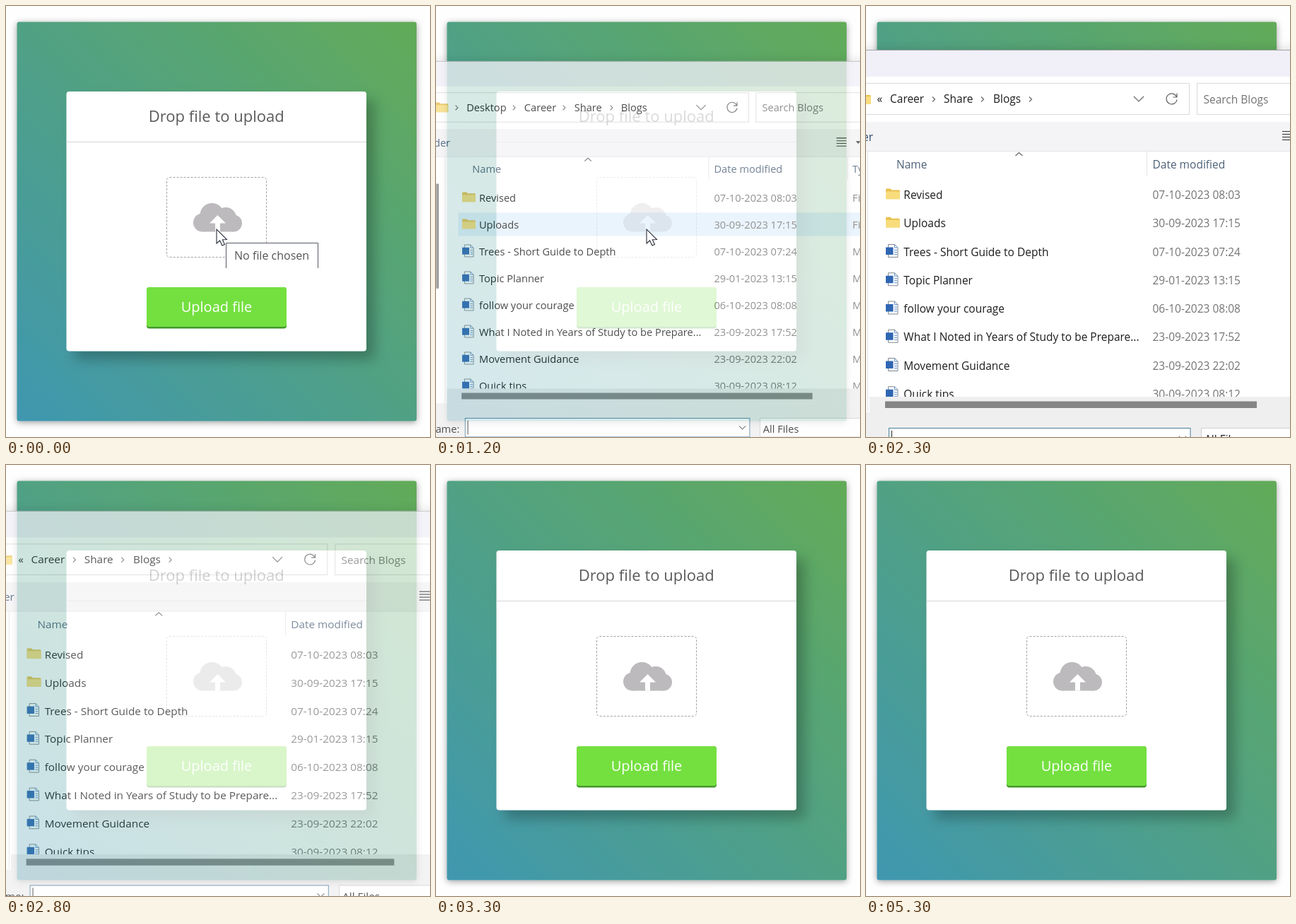
These frames come from a looping animation (600 by 610 pixels, 5400 ms). An HTML page:

```html
<!DOCTYPE html>
<html lang="en">
<head>
<meta charset="utf-8">
<title>File upload</title>
<style>
  html, body { margin: 0; width: 100%; height: 100%; overflow: hidden; background: #fefefe; }
  svg { display: block; }
  text { font: 15.5px "Open Sans", sans-serif; fill: #1d1d1d; white-space: pre; }
  .dim { fill: #747474; }
  .head { fill: #4d6178; }
  .end { text-anchor: end; }
  .mid { text-anchor: middle; }
  .line { fill: none; stroke: #666; stroke-width: 1.2; }
</style>
</head>
<body>
<svg width="600" height="610" viewBox="0 0 600 610">
  <defs>
    <linearGradient id="meadow" x1="0" y1="1" x2="1" y2="0">
      <stop stop-color="#3f97b0"/><stop offset="1" stop-color="#62ab58"/>
    </linearGradient>
    <filter id="soft"><feDropShadow dx="0" dy="2" stdDeviation="5" flood-opacity=".38"/></filter>
    <filter id="deep" x="-20%" y="-20%" width="140%" height="140%">
      <feDropShadow dx="12" dy="12" stdDeviation="9" flood-opacity=".25"/>
    </filter>
    <filter id="glow"><feDropShadow dx="0" dy="0" stdDeviation="8" flood-opacity=".16"/></filter>
    <g id="folder">
      <path d="M0 1.500q0-1.500 1.500-1.500h5l2 2h10q1.500 0 1.500 1.500v11H0z" fill="#e8c04e"/>
      <path d="M0 4h20v9.500q0 1.500-1.500 1.500h-17q-1.500 0-1.500-1.500z" fill="#f8dc7c"/>
    </g>
    <g id="doc">
      <path d="M3.500 .5h9l4.500 4.500v13.500h-13.500z" fill="#fff" stroke="#808890"/>
      <path d="M12.500 .5v4.500h4.500M12 8.500h4M12 11.500h4M12 14.500h4" fill="none" stroke="#5b8fd0"/>
      <rect y="4.500" width="10.500" height="10.500" fill="#2f66b3"/>
    </g>
  </defs>

  <rect x="15.500" y="22.500" width="565.500" height="565" rx="3" fill="url(#meadow)" filter="url(#soft)"/>
  <rect x="85.500" y="121" width="424.500" height="367.500" rx="4" fill="#fff" filter="url(#deep)"/>
  <path d="M86 192.500H510" stroke="#d6d6dc"/>
  <text class="mid" x="297.700" y="164" style="font-size:22px;fill:#5a5a5a">Drop file to upload</text>
  <rect x="227.500" y="242.500" width="141" height="113" rx="4" fill="none" stroke="#a2a2a2" stroke-dasharray="3 2"/>
  <g fill="#bcbabc">
    <circle cx="278" cy="306.500" r="13"/><circle cx="291.500" cy="296" r="17"/>
    <circle cx="311" cy="300" r="15"/><circle cx="322" cy="307.500" r="12"/>
    <rect x="278" y="300" width="44" height="19.500"/>
  </g>
  <path d="M299.500 296L311 307.500H303V319.500H296V307.500H288z" fill="#fff"/>
  <rect x="199" y="398" width="198" height="58.500" rx="4" fill="#429a2c"/>
  <rect x="199" y="398" width="198" height="56" rx="4" fill="#74e03f"/>
  <text class="mid" x="298" y="433" style="font-size:20px;fill:#fff">Upload file</text>

  <g id="tip">
    <rect x="311" y="335" width="131" height="36" fill="#fff"/>
    <path d="M311.500 371V335.500H441.500V371" fill="none" stroke="#555b66"/>
    <text x="323" y="359" style="font-size:16px;fill:#555">No file chosen</text>
  </g>

  <g id="dialog">
    <rect x="-400" y="62.500" width="1400" height="700" fill="#efefef" stroke="#a5a5a8" filter="url(#glow)"/>
    <rect x="-400" y="63" width="1400" height="37" fill="#f1f0f8"/>
    <rect x="-400" y="100" width="1400" height="475" fill="#fff"/>
    <g fill="#fff" stroke="#d9d9d9">
      <rect x="-100" y="109.500" width="557.500" height="44"/>
      <rect x="468.500" y="109.500" width="300" height="44"/>
    </g>
    <use href="#folder" x="-13" y="124"/>
    <g id="longPath"></g>
    <g id="shortPath"></g>
    <path class="line" d="M379 128l7 7 7-7M439.500 128.500a7.500 7.500 0 1 0 .5 4M440 123.500v5.500h-5.500"/>
    <text class="dim" x="477.500" y="137.500">Search Blogs</text>

    <rect x="-400" y="164" width="1400" height="41" fill="#f4f3f5"/>
    <path d="M-400 205.500H1000M397.500 206V240M605.500 206V240M2.500 206V574" stroke="#e3e3e6"/>
    <text class="end" x="10" y="190.500" style="fill:#2c4a6c">New folder</text>
    <path d="M589 177.500h15M589 181.500h15M589 185.500h15M589 189.500h15" stroke="#333" stroke-width="1.200"/>
    <path d="M618 182h7l-3.500 4z" fill="#333"/>
    <path class="line" d="M211.500 212l5-4.500 5 4.500"/>
    <text class="head" x="43" y="229.500">Name</text>
    <text class="head" x="405.500" y="229.500">Date modified</text>
    <text class="head" x="613" y="229.500">Type</text>
    <rect id="hover" x="22" width="900" height="35" fill="#e5f2fd"/>
    <g id="rows"></g>

    <rect x="5" y="553" width="995" height="22" fill="#efefef"/>
    <rect x="27" y="559.500" width="526" height="9.500" fill="#858585"/>
    <rect x="-11" y="246" width="4" height="157" fill="#858585"/>
    <text class="end" x="24" y="619">File name:</text>
    <rect x="32.500" y="597.500" width="426.500" height="28" fill="#fff" stroke="#4a7f9c"/>
    <path d="M36.500 601V622" stroke="#222"/>
    <path class="line" d="M443 609l5 5 5-5"/>
    <rect x="474.500" y="597.500" width="300" height="28" fill="#fff" stroke="#cfcfcf"/>
    <text x="479" y="619">All Files</text>
  </g>

  <path id="cursor" d="M0 0V20L4.500 16L8 23L11.500 21.500L8.300 14.800L14.500 14.500z" fill="#fff" stroke="#2b2f3a" stroke-width="1.100"/>
</svg>

<script>
const $ = id => document.getElementById(id);
const clamp = v => Math.min(1, Math.max(0, v));
const LOOP = 5400, STEP = 100, ROW_TOP = 267.5, ROW_GAP = 40.25;

const label = (x, y, text, cls = '') => `<text x="${x}" y="${y}" class="${cls}">${text}</text>`;
const chevron = x => `<path class="line" d="M${x - 2} 128.5l3.500 3.500-3.500 3.500"/>`;
const crumbs = (words, chevrons) =>
  words.map(([x, w]) => label(x, 137, w)).join('') + chevrons.map(chevron).join('');

$('longPath').innerHTML = crumbs(
  [[34.5, 'Desktop'], [121, 'Career'], [196, 'Share'], [266, 'Blogs']], [20, 106, 181, 252]);
$('shortPath').innerHTML = crumbs(
  [[15.5, '«'], [34, 'Career'], [110, 'Share'], [180, 'Blogs']], [96, 165, 233]);

const files = [
  ['Revised', '07-10-2023 08:03'],
  ['Uploads', '30-09-2023 17:15'],
  ['Trees - Short Guide to Depth', '07-10-2023 07:24'],
  ['Topic Planner', '29-01-2023 13:15'],
  ['follow your courage', '06-10-2023 08:08'],
  ['What I Noted in Years of Study to be Prepare...', '23-09-2023 17:52'],
  ['Movement Guidance', '23-09-2023 22:02'],
  ['Quick tips', '30-09-2023 08:12']
];
$('rows').innerHTML = files.map(([name, date], i) => {
  const y = ROW_TOP + i * ROW_GAP, isFolder = i < 2;
  return `<use href="#${isFolder ? 'folder' : 'doc'}" x="28" y="${y - (isFolder ? 9 : 11)}"/>`
    + label(53.3, y + 5.7, name) + label(405.5, y + 5.7, date, 'dim')
    + label(613, y + 5.7, isFolder ? 'File folder' : 'Memo', 'dim');
}).join('');

// Pointer stops: time, x, y
const track = [[0, 298, 316], [1300, 298, 316], [1600, 345, 305], [1700, 385, 318],
  [1800, 445, 365], [1900, 520, 450], [2000, 580, 550], [2100, 630, 640]];

function pointerAt(t) {
  const i = track.findIndex(stop => stop[0] > t);
  if (i < 0) return track[track.length - 1].slice(1);
  const [t0, x0, y0] = track[i - 1], [t1, x1, y1] = track[i];
  const k = (t - t0) / (t1 - t0);
  return [x0 + (x1 - x0) * k, y0 + (y1 - y0) * k];
}

const show = (id, on) => $(id).setAttribute('display', on ? 'inline' : 'none');

function draw(now) {
  const t = Math.floor(now % LOOP / STEP) * STEP;
  const [x, y] = pointerAt(t);
  $('cursor').setAttribute('transform', `translate(${x} ${y})`);
  show('cursor', t < 2100);
  show('tip', t < 900);

  const opening = 1 - (1 - clamp((t - 1150) / 284)) ** 3;
  const closing = clamp((t - 2770) / 108);
  const scale = 0.9 + 0.1 * opening - 0.13 * closing ** 2;
  $('dialog').setAttribute('transform', `translate(190 346) scale(${scale}) translate(-190 -346)`);
  $('dialog').setAttribute('opacity', clamp((t - 1150) / 64) * (1 - closing));
  show('longPath', t < 1400);
  show('shortPath', t >= 1400);

  const row = Math.round((y - ROW_TOP) / ROW_GAP);
  $('hover').setAttribute('y', ROW_TOP + row * ROW_GAP - 18.5);
  show('hover', t < 2100 && row < files.length);
}

const start = performance.now();
(function tick() {
  draw(performance.now() - start);
  requestAnimationFrame(tick);
})();
</script>
</body>
</html>
```
